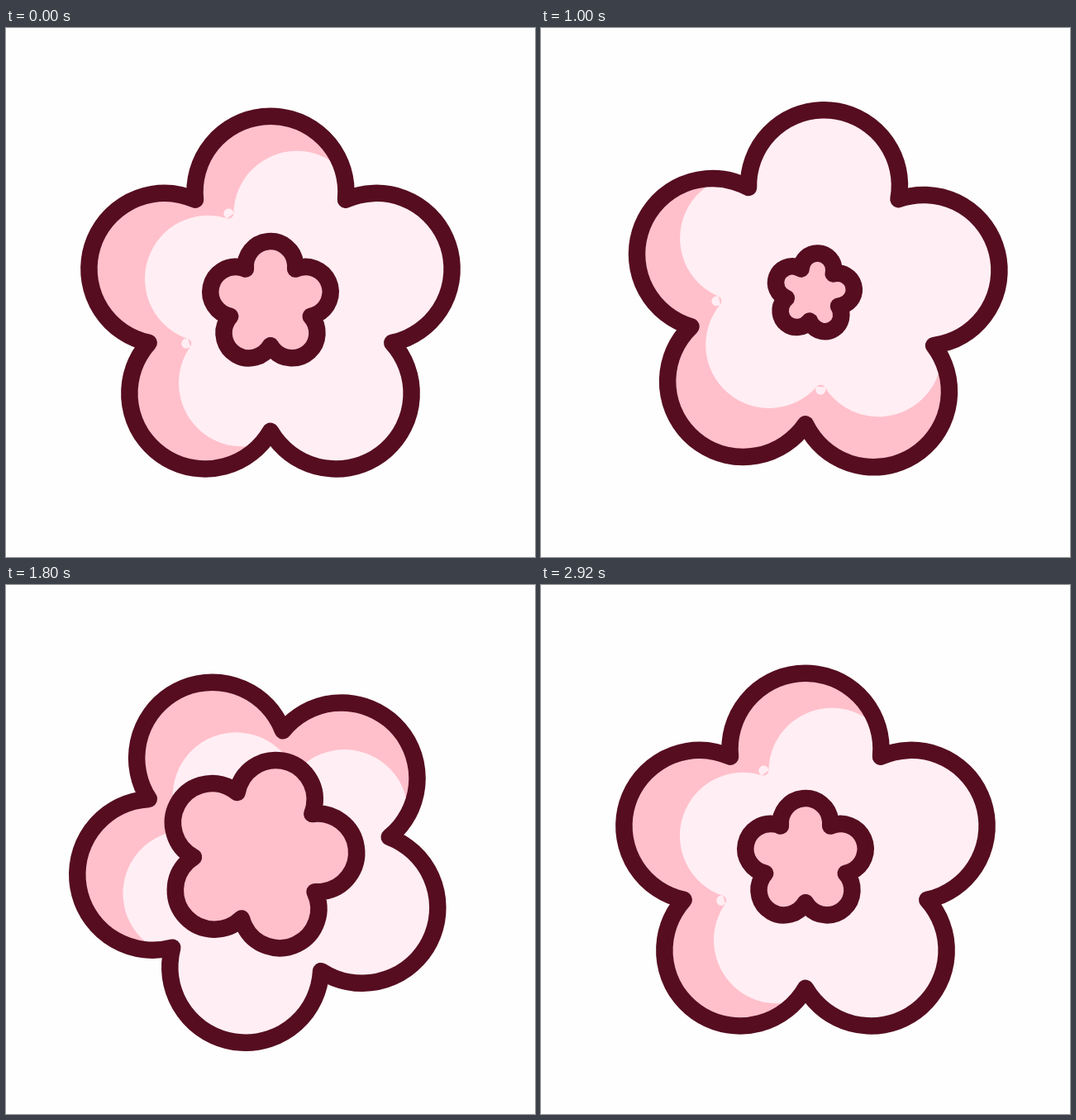
Write an HTML page with a canvas that moves like this. It is 640 px wide and 640 px high and loops after 3000 ms.

```html
<!DOCTYPE html>
<html lang="en">
<head>
<meta charset="utf-8">
<title>Blossom</title>
<style>
  html, body { margin: 0; width: 100%; height: 100%; overflow: hidden; background: #fefefe; }
  canvas { display: block; width: 640px; height: 640px; }
</style>
</head>
<body>
<canvas width="640" height="640"></canvas>
<script>
const ctx = document.querySelector('canvas').getContext('2d');
const LOOP = 3000, LAG = 62, RAD = Math.PI / 180, HALF = 36 * RAD;
const PINK = '#ffc0cb', BLUSH = '#ffeef4', WINE = '#560d20';
const DIST = 134.7, RADIUS = 91.5;  // petal circles of the full-size flower
const DROP = 13;                    // flower centre below the turning point

const SOFT = [1 / 3, 2 / 3], TAIL = [0.45, 0.45];
const turn = [[0, 0], [970, -68, SOFT], [1805, 45, SOFT], [2880, 0, TAIL]];
const size = [[0, 0.331], [960, 0.215, SOFT], [1770, 0.518, SOFT], [2790, 0.331, TAIL]];

// Cubic Bezier easing with flat ends
function ease(x, [x1, x2]) {
  let lo = 0, hi = 1;
  for (let i = 0; i < 24; i++) {
    const s = (lo + hi) / 2, q = 1 - s;
    if (3 * s * q * q * x1 + 3 * s * s * q * x2 + s * s * s < x) lo = s; else hi = s;
  }
  return lo * lo * (3 - 2 * lo);
}

function valueAt(track, t) {
  if (t <= 0) return track[0][1];
  for (let i = 1; i < track.length; i++) {
    const [t0, v0] = track[i - 1], [t1, v1, curve] = track[i];
    if (t < t1) return v0 + (v1 - v0) * ease((t - t0) / (t1 - t0), curve);
  }
  return track[track.length - 1][1];
}

// Adds petal arcs, joined by rounded notches; trim shortens both outer ends
function petals(cx, cy, scale, from, to, bump = 0, trim = 0) {
  const d = DIST * scale, r = RADIUS * scale;
  const notch = d * Math.cos(HALF) + Math.sqrt((r + bump) ** 2 - (d * Math.sin(HALF)) ** 2);
  const span = Math.atan2(notch * Math.sin(HALF), notch * Math.cos(HALF) - d);
  for (let k = from; k <= to; k++) {
    const a = (k * 72 - 90) * RAD;
    const start = trim && k === from ? trim : span, end = trim && k === to ? trim : span;
    ctx.arc(cx + d * Math.cos(a), cy + d * Math.sin(a), r, a - start, a + end);
    if (bump && k < to) {
      const b = a + HALF;
      ctx.arc(cx + notch * Math.cos(b), cy + notch * Math.sin(b), bump,
        a + span + Math.PI, 2 * b - a - span - Math.PI, true);
    }
  }
}

function flower(cy, scale) {
  ctx.beginPath();
  petals(0, cy, scale, 0, 4);
  ctx.closePath();
}

function highlight() {
  ctx.save();
  flower(DROP, 1);
  ctx.clip();
  ctx.beginPath();
  petals(32, 18.3, 0.838, -2, 0, 6, 52 * RAD);
  ctx.lineTo(320, -320);
  ctx.lineTo(320, 320);
  ctx.lineTo(0, 320);
  ctx.fillStyle = BLUSH;
  ctx.fill();
  ctx.restore();
}

function draw(t) {
  ctx.fillStyle = '#fefefe';
  ctx.fillRect(0, 0, 640, 640);
  ctx.save();
  ctx.translate(320, 320);
  ctx.rotate(valueAt(turn, t) * RAD);
  ctx.fillStyle = PINK;
  ctx.strokeStyle = WINE;
  ctx.lineWidth = 20.5;
  ctx.lineJoin = 'round';

  flower(DROP, 1);
  ctx.fill();
  highlight();
  flower(DROP, 1);
  ctx.stroke();

  // The centre follows the same turn a moment later
  const scale = valueAt(size, t);
  ctx.translate(0, 8.7);
  ctx.rotate(valueAt(turn, t - LAG) * RAD);
  flower(DROP * scale, scale);
  ctx.fill();
  ctx.stroke();
  ctx.restore();
}

const begin = performance.now();
function tick() {
  draw((performance.now() - begin) % LOOP);
  requestAnimationFrame(tick);
}
tick();
</script>
</body>
</html>
```
